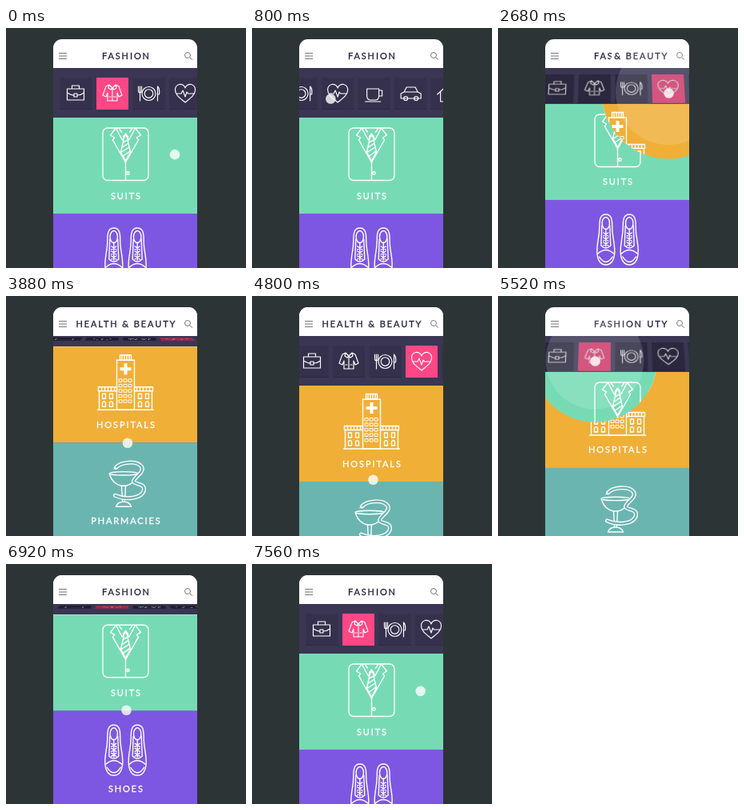
Write an HTML page that moves like this. It is 300x300 px and loops after 7.6 s.

```html
<!DOCTYPE html>
<html>
<head>
<meta charset="utf-8">
<style>
html, body { margin: 0; width: 100%; height: 100%; overflow: hidden; background: #2d3436; }
#phone { position: absolute; left: 0; top: 0; width: 300px; height: 300px;
  clip-path: inset(14px 61px 0 59px round 11px 11px 0 0); }
#phone > svg { position: absolute; left: 0; top: 0; }
#bar { position: absolute; z-index: 3; left: 59px; top: 50px; width: 180px; overflow: hidden; background: #3a3653; }
#row { position: absolute; left: 0; width: 180px; height: 40px; transform-origin: 50% 0; }
#row svg { position: absolute; left: 0; top: 0; overflow: visible; }
#touch { z-index: 4; }
text { font: 11px Lato, "Open Sans", sans-serif; letter-spacing: 1.9px; text-anchor: middle; stroke-width: .35px; }
.title { fill: #2b2943; stroke: #2b2943; }
.label { fill: #fff; stroke: #fff; }
.line { fill: none; stroke: #fff; stroke-width: 1.4; stroke-linejoin: round; stroke-linecap: round; }
.tile .line { stroke-width: 1.15; }
.tool { fill: none; stroke: #77757f; stroke-width: 1; }
</style>
</head>
<body>
<div id="phone">
  <svg id="fashion" width="300" height="300"></svg>
  <svg id="health" width="300" height="300"></svg>
  <div id="bar"><div id="row"><svg id="tiles" width="180" height="40"></svg></div></div>
  <svg id="touch" width="300" height="300">
    <circle id="ripple" fill="#fff"/>
    <circle id="dot" r="6.3" fill="#fff" fill-opacity=".8"/>
  </svg>
</div>
<script>
const $ = id => document.getElementById(id);
const path = (d, extra = '') => `<path d="${d}" ${extra}/>`;
const range = n => [...Array(n).keys()];

// Panel art: x is measured from the panel's middle, y from its top
const half = path('M-12 13L-19 22L-14 25L-16 28L0 56M-12 13L-8 21L-4 28L0 22M-8 14L-5 18');
const suit = `<rect x="-28.5" y="13" width="57" height="65.5" rx="6"/>${half}
  <g transform="scale(-1 1)">${half}</g>
  ${path('M-3 24L0 20L3 24L2.5 28L6 43L0 54L-6 43L-2.5 28ZM-3 31L2.5 28M-4 37L3.5 32M-5 43L4.5 37M-3 48L5.5 42M0 56V78')}
  <circle cx="3" cy="69.500" r="1.7"/>`;

const shoe = path('M0 18C7 18 8 24 8 34C8 46 11 52 11 64C11 76 6 81 0 81S-11 76-11 64C-11 52-8 46-8 34C-8 24-7 18 0 18Z') +
  '<ellipse cy="29" rx="4.700" ry="7.500"/>' +
  path('M-5 32L-6 57Q0 63 6 57L5 32M-10 67Q0 58 10 67M-8.500 71Q0 84 8.500 71M0 36V58') +
  range(3).map(i => path(`M-3 ${41 + i * 6}l6 4m0-4l-6 4`)).join('');
const shoes = [-14.7, 14.7].map(x => `<g transform="translate(${x})">${shoe}</g>`).join('');

const wing = `<rect x="-34" y="50.5" width="23" height="5"/>${path('M-33 55.500V79')}` +
  range(5).map(i => path(`M${-30 + i * 4} 51v4`)).join('') +
  [-29, -20].map(x => `<rect x="${x}" y="59" width="4" height="6"/>` +
    path(`M${x} 75v-5q2-3 4 0v5z`)).join('');
const hospital = `<rect x="-11" y="17" width="22" height="62"/><rect x="-7" y="10.5" width="14" height="6.5"/>
  ${range(4).map(i => path(`M${-4.5 + i * 3} 11v5`)).join('')}
  ${path('M0 21v14M-7 28h14', 'stroke-width="4" stroke-linecap="butt"')}
  ${range(15).map(i => `<rect x="${-8 + i % 3 * 6}" y="${40.5 + (i / 3 | 0) * 6.5}" width="3.5" height="3.5" stroke-width="1"/>`).join('')}
  ${wing}<g transform="scale(-1 1)">${wing}</g>${path('M-35 79H35')}`;

const snake = 'M-12 31C-6 24 14 22 20 30C24 37 12 42 10 48C10 53 24 50 23 59C21 70 0 72-13 66';
const pharmacy = `<ellipse cx="-2.5" cy="38.500" rx="18" ry="2.2"/>
  ${path('M-20 40Q-16 52-5 54L-4 73M15 40Q11 52 0 54L-1 73M-6 54H1M-12 80Q-10 74-2.500 74T7 80Z')}
  ${path(snake, 'stroke-width="5"')}${path(snake, 'stroke-width="2.400" stroke="#6bb5b1"')}
  ${path('M-12 31l-3 2', 'stroke-width="1"')}`;

function scene(id, title, panels) {
  $(id).innerHTML = `<rect width="300" height="120" fill="#fff"/>
    ${path('M66 31.500h10M66 35h10M66 38.500h10', 'class="tool"')}
    <circle cx="227" cy="34" r="3.500" class="tool"/>${path('M229.500 36.500l3.300 3.300', 'class="tool"')}
    <text class="title" x="150.4" y="38.5">${title}</text>
    <g class="panels">${panels.map(([color, name, art], i) => `
      <g transform="translate(149.5 ${i * 120})">
        <rect x="-91" width="182" height="120" fill="${color}"/>
        <g class="line">${art}</g>
        <text class="label" x=".9" y="101.500">${name}</text>
      </g>`).join('')}</g>`;
}
scene('fashion', 'FASHION', [['#76dbb4', 'SUITS', suit], ['#7d57e1', 'SHOES', shoes], ['#f0af37', '', '']]);
scene('health', 'HEALTH &amp; BEAUTY', [['#f0af37', 'HOSPITALS', hospital], ['#6bb5b1', 'PHARMACIES', pharmacy], ['#e8735a', '', '']]);

// Category icons in 40 px tiles
const icons = [
  path('M9 14h21v14h-21zM15 14v-4h9v4M9 19Q14 22 17.500 22M21.500 22Q26 22 30 19M17.500 20h4v4h-4z'),
  path('M16 9L12 11L8 22L12 24L14 19V29H26V19L28 24L32 22L28 11L24 9L20 13ZM16 9L15 13L18 15L20 13L22 15L25 13L24 9M20 13V29M16 24h2M22 24h2'),
  '<circle cx="20" cy="20" r="8.500"/><circle cx="20" cy="20" r="5.300"/>' +
    path('M7 11v5q0 3 2 3t2-3v-5M9 11v18M31 29V11Q34 14 33 21H31'),
  path('M20 31C14 26 7.500 22 7.500 15.500A6.400 6.400 0 0 1 20 13A6.400 6.400 0 0 1 32.500 15.500C32.500 22 26 26 20 31ZM9 20h6l2-4l3 8l2-6l1.500 2h8'),
  path('M11 14h15v9q0 5-5 5h-5q-5 0-5-5zM26 16h4v7h-4M9 30h19'),
  path('M8 26v-6l4-2l3-6h11l3 6l4 2v6zM12 18h17') + '<circle cx="14" cy="26" r="2.500"/><circle cx="27" cy="26" r="2.500"/>',
  path('M8 21L20 10L32 21M12 18V30H28V18M18 30v-7h4v7')
];
$('tiles').innerHTML = icons.map((art, i) => `<g class="tile" transform="translate(${8.5 + i * 45.5})">
  <rect width="40" height="40" fill="#35314d"/><rect y="39" width="40" height="1" fill="#2e2a44"/>
  <rect class="lit" width="40" height="40" fill="#ff4785" opacity="0"/><g class="line">${art}</g></g>`).join('');
const lit = document.querySelectorAll('.lit');

const LOOP = 7600, TAP1 = 2426, TAP2 = 5266;
const prog = (t, a, b) => Math.min(1, Math.max(0, (t - a) / (b - a)));
const soft = p => (1 - Math.cos(Math.PI * p)) / 2;
const out = p => 1 - (1 - p) ** 2;

// start, end, x, y, easing, bend of the path in x and y
const moves = [
  [280, 920, 87, 88.5, soft],
  [1360, 1760, 211, 139, soft, .9, .1],
  [2160, 2400, 213.5, 81.5, soft],
  [3320, 3600, 152, 170.5, soft],
  [3840, 4200, 152, 232.5, out],
  [4760, 5230, 121.5, 81.5, soft],
  [5640, 5960, 200.5, 109.5, soft],
  [6560, 6760, 150.5, 169.5, soft],
  [6880, 7240, 150.5, 231.5, out],
  [7400, 7700, 224, 88.5, soft, 1.04, .41]
];

function pointer(t) {
  // the last move runs on across the loop's seam
  const T = t < 200 ? t + 7560 : Math.min(t, 7560);
  let x = 224, y = 88.5;
  for (const [a, b, x1, y1, ease, bx = .5, by = .5] of moves) {
    if (T <= a) break;
    const p = ease(prog(T, a, b)), q = 2 * p * (1 - p);
    x += (x1 - x) * (q * bx + p * p);
    y += (y1 - y) * (q * by + p * p);
  }
  return [x, y];
}

function draw(t) {
  const [x, y] = pointer(t);
  $('dot').setAttribute('cx', x);
  $('dot').setAttribute('cy', y);

  // folding category bar
  const fold = soft(prog(t, 2530, 2960)) - out(prog(t, 3840, 4200)) +
    soft(prog(t, 5370, 5800)) - out(prog(t, 6880, 7240));
  const height = 62 * (1 - fold), angle = Math.min(90, 108 * fold);
  const scroll = t < 280 || t > 6400 ? 0 : t < 1760 ? (x - 224) * .93 : -12;
  $('bar').style.height = height + 'px';
  $('row').style.top = Math.max(0, 12 * (1 - 1.1 * fold)) + 'px';
  $('row').style.transform = `perspective(800px) rotateX(${angle}deg)`;
  $('row').style.filter = `brightness(${1 - .4 * Math.sin(angle * Math.PI / 180)})`;
  $('tiles').style.transform = `translateX(${scroll}px)`;
  for (const g of document.querySelectorAll('.panels')) g.setAttribute('transform', `translate(0 ${50 + height})`);

  const heart = prog(t, TAP1 - 60, TAP1 + 60) - prog(t, TAP2 - 60, TAP2 + 60);
  lit[1].setAttribute('opacity', 1 - heart);
  lit[3].setAttribute('opacity', heart);

  // circular reveal of the next scene
  const back = t >= TAP2, cx = back ? 121 : 213;
  const p = prog(t, back ? TAP2 : TAP1, (back ? TAP2 : TAP1) + 680);
  const r = soft(p) * (Math.hypot(back ? 239 - cx : cx - 59, 220) + 2);
  const [top, under] = back ? ['fashion', 'health'] : ['health', 'fashion'];
  $(top).style.zIndex = 2;
  $(top).style.clipPath = `circle(${r}px at ${cx}px 80px)`;
  $(under).style.zIndex = 1;
  $(under).style.clipPath = 'none';
  const ripple = { cx, cy: 80, r: r * .79, opacity: .23 * (1 - p) };
  for (const k in ripple) $('ripple').setAttribute(k, ripple[k]);
}

const start = performance.now();
function tick() {
  draw((performance.now() - start) % LOOP);
  requestAnimationFrame(tick);
}
tick();
</script>
</body>
</html>
```
